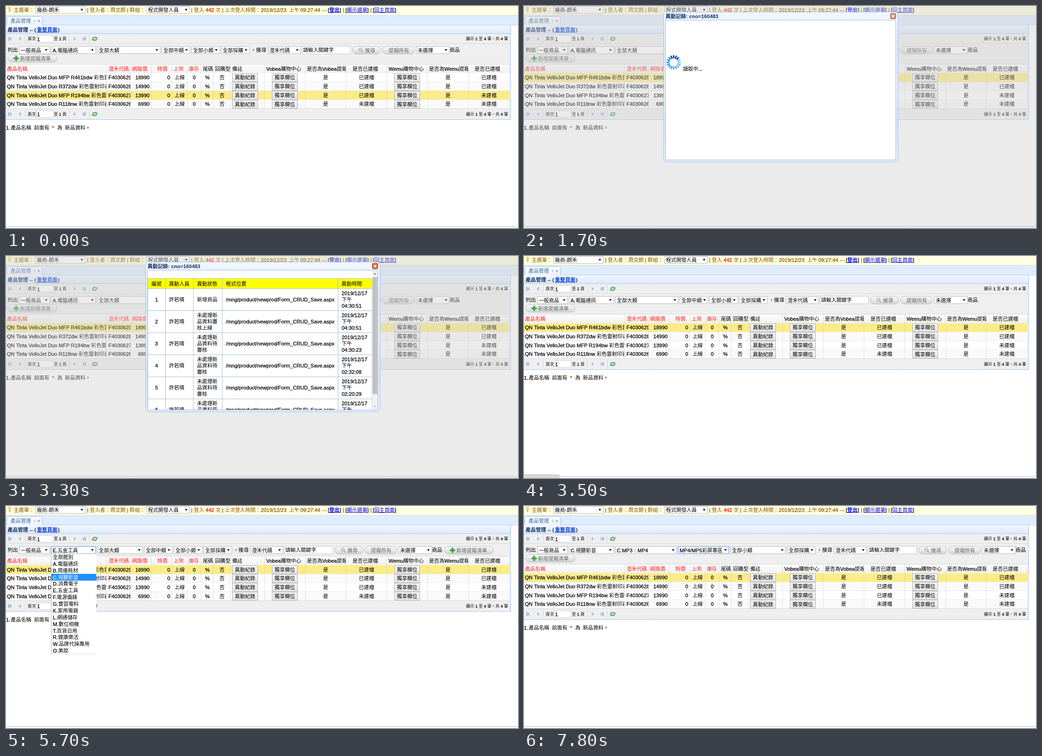
Write an HTML page with a canvas that moves like this. It is 1134 px wide and 494 px high and loops after 8000 ms.

```html
<!DOCTYPE html>
<html lang="zh-Hant">
<head>
<meta charset="utf-8">
<title>產品管理</title>
<style>
html, body { margin: 0; width: 100%; height: 100%; overflow: hidden; background: #fff; }
canvas { display: block; width: 1134px; height: 494px; }
</style>
</head>
<body>
<canvas id="stage"></canvas>
<script>
const W = 1134, H = 494, LOOP = 8000;
const canvas = document.getElementById('stage');
const dpr = window.devicePixelRatio || 1;
canvas.width = W * dpr;
canvas.height = H * dpr;
const c = canvas.getContext('2d');

const SANS = '"Liberation Sans", "Noto Sans CJK TC", "Noto Sans CJK", sans-serif';
const SIZE = 11.33, SMALL = 9;
const BLUE = '#99bbe8', LINK = '#0000ee', BROWN = '#8a5200', NAVY = '#0e2d5f';

const MENU1 = ['全部館別', 'A.電腦通訊', 'B.周邊耗材', 'C.視聽影音', 'D.消費電子', 'E.五金工具', 'F.電源儀錶',
  'G.實習電料', 'K.家用電器', 'L.網通儲存', 'M.數位相機', 'T.百貨日用', 'R.健康樂活', 'W.品牌代操專用', 'O.美妝'];
const MENU2 = ['全部大類', 'C.電視音響', 'C.MP3｜MP4', 'C.耳機', 'C.麥克風', 'C.喇叭', 'C.投影機',
  'C.錄音筆', 'C.播放器', 'C.影音線材', 'C.生活電器'];
const MENU3 = ['全部中類', 'MP3隨身聽', 'MP4/MP5彩屏專區', '影音配件'];
const MENUS = { 1: MENU1, 2: MENU2, 3: MENU3 };

const PRODUCTS = [
  ['QN Tinta VelloJet Duo MFP R461bdw', '18990', 1, 1],
  ['QN Tinta VelloJet Duo R372dw', '14990', 1, 1],
  ['QN Tinta VelloJet Duo MFP R194bw', '13990', 1, 0],
  ['QN Tinta VelloJet Duo R118nw', '6990', 0, 0]
];
const COLS = [0, 222.5, 276, 321.5, 367, 402, 432, 459, 497, 572.5, 663, 753, 843.5, 934, 1024, 1115];

// Each step changes some fields of the state and holds until the next.
const START = { sel: 2, hover: -1, view: '', scroll: 0, focus: -1, over: -1, open: 0, mark: 0,
  a: MENU1[1], b: MENU2[0], m: MENU3[0], wb: 140, wm: 63, ws: 63 };
const STEPS = [
  [1100, { hover: 1 }],
  [1300, { hover: 0 }],
  [1500, { press: 1 }],
  [1700, { hover: -1, press: 0, sel: 0, view: 'load' }],
  [1800, { view: 'table' }],
  [2500, { scroll: 25 }],
  [2700, { scroll: 0 }],
  [3300, { close: 1 }],
  [3500, { view: '', close: 0, status: 1 }],
  [3600, { status: 0 }],
  [3800, { reload: 1 }],
  [3900, { reload: 0 }],
  [4000, { over: 2 }],
  [4100, { over: 1 }],
  [4300, { over: -1, focus: 1, open: 1, mark: 1 }],
  [4500, { mark: 2 }],
  [4600, { mark: 4 }],
  [4700, { mark: 5 }],
  [4800, { open: 0, a: MENU1[5] }],
  [4900, { wb: 101 }],
  [5500, { open: 1, mark: 5 }],
  [5600, { mark: 4 }],
  [5700, { mark: 3 }],
  [6000, { open: 0, a: MENU1[3] }],
  [6100, { wb: 136.3 }],
  [6300, { focus: 2 }],
  [6400, { open: 2, mark: 0 }],
  [6600, { mark: 1 }],
  [6700, { mark: 2 }],
  [6900, { open: 0, b: MENU2[2], wm: 113 }],
  [7100, { focus: 3 }],
  [7200, { open: 3, mark: 0 }],
  [7400, { mark: 1 }],
  [7500, { mark: 2 }],
  [7800, { open: 0, m: MENU3[2], ws: 123 }]
];

function stateAt(t) {
  const s = { ...START };
  for (const [at, change] of STEPS) if (t >= at) Object.assign(s, change);
  return s;
}

function box(x, y, w, h, fill, stroke, r = 0) {
  c.beginPath();
  if (r) c.roundRect(x, y, w, h, r); else c.rect(x, y, w, h);
  if (Array.isArray(fill)) {
    const g = c.createLinearGradient(0, y, 0, y + h);
    fill.forEach((color, i) => g.addColorStop(i / (fill.length - 1), color));
    fill = g;
  }
  if (fill) { c.fillStyle = fill; c.fill(); }
  if (stroke) { c.strokeStyle = stroke; c.lineWidth = 1; c.stroke(); }
}

function line(x1, y1, x2, y2, color, width = 1) {
  c.strokeStyle = color;
  c.lineWidth = width;
  c.beginPath();
  c.moveTo(x1, y1);
  c.lineTo(x2, y2);
  c.stroke();
}

function poly(points, color) {
  c.fillStyle = color;
  c.beginPath();
  points.forEach(([x, y]) => c.lineTo(x, y));
  c.fill();
}

// y is the middle of the line; Latin runs are slightly emboldened.
function text(str, x, y, { color = '#000', size = SIZE, align = 'left', bold = false, underline = false } = {}) {
  c.font = `${bold ? 'bold ' : ''}${size}px ${SANS}`;
  const w = c.measureText(str).width;
  if (align === 'right') x -= w;
  if (align === 'center') x -= w / 2;
  c.fillStyle = c.strokeStyle = color;
  const base = y + size * 0.36;
  let at = x;
  for (const run of str.match(/[\x00-\xff]+|[^\x00-\xff]+/g)) {
    c.fillText(run, at, base);
    if (!bold && run.charCodeAt(0) < 256) { c.lineWidth = 0.3; c.strokeText(run, at, base); }
    at += c.measureText(run).width;
  }
  if (underline) line(x, y + 5.5, x + w, y + 5.5, color);
}

function clipped(x, y, w, h, draw) {
  c.save();
  c.beginPath();
  c.rect(x, y, w, h);
  c.clip();
  draw();
  c.restore();
}

function select(x, y, w, label, focused, over) {
  box(x + 0.5, y + 0.5, w - 1, 16, '#fff', focused ? '#4d8be0' : over ? '#777' : '#b4b4b4');
  text(label, x + 3.5, y + 9);
  poly([[x + w - 11, y + 6.5], [x + w - 5, y + 6.5], [x + w - 8, y + 11]], '#222');
}

function pill(x, y, w, label, pad) {
  box(x + 0.5, y + 0.5, w - 1, 17, ['#fafafa', '#e9e9e9', '#d2d2d2'], '#bdbdbd', 8.5);
  text(label, x + pad, y + 9, { color: '#666' });
}

function button(x, y, label, pressed) {
  box(x + 0.5, y + 0.5, 56, 18, pressed ? '#dcdcdc' : ['#f6f6f6', '#e6e6e6'], pressed ? '#777' : '#adadad');
  text(label, x + 28.5, y + 9.5, { align: 'center' });
}

function arrowIcon(x, y, dir, bar) {
  poly([[x + 3 * dir, y], [x - 2 * dir, y - 4.5], [x - 2 * dir, y + 4.5]], '#9dbce6');
  if (bar) box(x + 3.5 * dir - 1, y - 4.5, 2, 9, '#86a9da');
}

function refreshIcon(x, y) {
  for (const d of [1, -1]) {
    c.strokeStyle = '#55a868';
    c.lineWidth = 2.6;
    c.beginPath();
    c.ellipse(x, y, 4.3, 3.3, 0, d > 0 ? 3.3 : 0.15, d > 0 ? 5.6 : 2.5);
    c.stroke();
    poly([[x + 6 * d, y - 4.5 * d], [x + 6 * d, y], [x + 1.5 * d, y]], '#55a868');
  }
}

function pager(y, reload) {
  box(0, y - 11, 1117, 22, '#efefef');
  arrowIcon(10, y, -1, true);
  arrowIcon(31, y, -1);
  arrowIcon(152, y, 1);
  arrowIcon(172, y, 1, true);
  for (const x of [42.5, 140.5, 184.5]) line(x, y - 9, x, y + 9, '#d6d6d6');
  if (reload) box(186.5, y - 9.5, 20, 19, '#e3eeff', BLUE, 2);
  refreshIcon(196.5, y);
  text('頁次', 48, y, { size: SMALL });
  box(67.5, y - 7.5, 37, 15, '#fff', '#cfcfcf');
  text('1', 69, y + 0.5);
  text('至 1 頁', 106, y, { size: SMALL });
  text('顯示 1 至 4 筆，共 4 筆', 1112, y, { size: SMALL, align: 'right' });
}

function topBar() {
  box(0, 0, W, 20, '#ffffe1');
  line(0, 20.5, W, 20.5, '#d5dbe2');
  c.fillStyle = '#f3d768';
  c.beginPath();
  c.arc(8, 5, 3.6, 0, 7);
  c.fill();
  box(6.5, 8, 3, 5, '#b9b39a');
  const parts = [['主選單：', 17], ['| 登入者：周文朗 | 群組：', 179.5], ['| 登入', 410],
    ['次 | 上次登入時間：', 464], ['2019/12/23', 564.5], ['上午', 627], ['09:27:44 ---', 652],
    ['|', 746], ['|', 807]];
  for (const [str, x] of parts) text(str, x, 9, { color: BROWN });
  text('442', 442, 9, { color: '#f00' });
  select(65, 0, 111, '廠商-朗禾');
  select(311, 0, 96, '程式開發人員');
  for (const [str, x, end, bold] of [['登出', 716, 739, true], ['顯示選單', 755, 800], ['回主頁面', 815.5, 861]]) {
    text('[', x - 3.3, 9);
    text(str, x, 9, { color: LINK, underline: true, bold });
    text(']', end, 9);
  }
}

function tabs() {
  box(0, 21, W, 21, '#e0ecff');
  box(1.5, 23.5, 79, 20, ['#ffffff', '#eaf2ff'], BLUE, [4, 4, 0, 0]);
  text('產品管理', 10, 33, { color: '#416aa3' });
  c.strokeStyle = '#8c9cb4';
  c.lineWidth = 1;
  c.beginPath();
  c.arc(64, 33, 2, 0.3, 5.4);
  c.stroke();
  line(70.5, 31, 75, 35.5, '#7b9cc9', 1.2);
  line(75, 31, 70.5, 35.5, '#7b9cc9', 1.2);
  box(0, 42, 1117, 20, ['#f3f8ff', '#dce9fd']);
  line(80, 42.5, W, 42.5, '#b8d0f0');
  line(0, 61.5, 1117, 61.5, '#adc8ec');
  text('產品管理 -- (', 3.5, 53, { color: NAVY, bold: true });
  text('重整頁面', 68.5, 53, { color: '#0b3fd0', bold: true, underline: true });
  text(')', 115, 53, { color: NAVY, bold: true });
}

// Places the filter row; the last button wraps when it runs out of room.
function toolbar(s) {
  const labels = ['一般商品', s.a, s.b, s.m, '全部小類', '全部採購'];
  const widths = [68, 99.5, s.wb, s.wm, s.ws, 63];
  const xs = [];
  let end = 26.2;
  for (const w of widths) { xs.push(end + 2.8); end += w + 2.8; }
  const wraps = end + 579 > 1115;
  const dy = wraps ? 0 : -17.8;
  box(0, 84, 1117, 45 + dy, '#efefef');
  line(0, 83.5, 1117, 83.5, '#d9d9d9');
  text('列出', 3.5, 98);
  labels.forEach((label, i) => select(xs[i], 89.5, widths[i], label, s.focus === i, s.over === i));
  text('，搜尋', end + 3, 98);
  select(end + 40.5, 89.5, 73, '澄禾代碼');
  box(end + 116.5, 89.5, 107, 17, '#fff', '#c4c4c4');
  text('請輸入關鍵字', end + 118.5, 98);
  pill(end + 227.5, 89.5, 63.5, '搜尋', 28);
  const gx = end + 245.5;
  c.fillStyle = '#c4def4';
  c.strokeStyle = '#8fb3d3';
  c.lineWidth = 1.3;
  c.beginPath();
  c.arc(gx, 97, 3.6, 0, 7);
  c.fill();
  c.stroke();
  line(gx + 2.5, 99.8, gx + 5.5, 103, '#c99a6a', 2);
  pill(end + 294, 89.5, 72, '提報所有', 14);
  select(end + 369, 89.5, 74, '未選擇');
  text('商品', end + 443, 98);
  const px = wraps ? 3.5 : end + 469.5, py = wraps ? 107.5 : 89.5;
  pill(px, py, 110, '新增提報清單', 27.5);
  box(px + 17, py + 3, 4, 12, '#3aa33c', null, 1);
  box(px + 13, py + 7, 12, 4, '#3aa33c', null, 1);
  return { xs, widths, dy };
}

function grid(s, dy) {
  const top = 129 + dy, rowH = 19.7, first = top + 20.5, bottom = first + 4 * rowH;
  box(0, top, 1117, 20.5, ['#fdfdfd', '#f1f1f1']);
  line(0, top + 0.5, 1117, top + 0.5, '#d4d4d4');
  const heads = [['產品名稱', 2, 1], ['澄禾代碼', 227, 1], ['網路價', 279, 1], ['特價', 335, 1], ['上架', 371, 1],
    ['庫存', 405, 1], ['尾碼', 436], ['回購型', 463], ['備註', 501], ['Vobea購物中心', 576.5],
    ['是否為Vobea提報', 666.5], ['是否已建檔', 767.5], ['Wemu購物中心', 847.5],
    ['是否為Wemu提報', 937], ['是否已建檔', 1038]];
  heads.forEach(([str, x, red], i) => clipped(COLS[i], top, COLS[i + 1] - COLS[i], 21, () =>
    text(str, x, top + 11, { color: red ? '#f22' : '#000' })));

  PRODUCTS.forEach(([name, price, listedA, listedB], i) => {
    const y = first + i * rowH, mid = y + 9.8;
    box(0, y, 1115, rowH, i === s.sel ? '#fbec88' : i === s.hover ? '#d0e5f5' : i % 2 ? '#fafafa' : '#fff');
    line(0, y + rowH, 1115, y + rowH, '#dedede');
    clipped(0, y, 222, rowH, () => text(name + ' 彩色雷射印表機', 2, mid));
    clipped(222, y, 54, rowH, () => text('F403062' + (9 - i), 227, mid));
    text(price, 318, mid, { align: 'right' });
    text('0', 363.5, mid, { align: 'right' });
    const built = ok => ok ? '已建檔' : '未建檔';
    for (const [str, x] of [['上線', 384.5], ['0', 417], ['%', 446], ['否', 478.5], ['是', 708],
      [built(i < 3), 798.5], ['是', 979], [built(listedB), 1069.5]]) text(str, x, mid, { align: 'center' });
    button(501, y + 0.4, '異動紀錄', s.press && i === 0);
    button(589, y + 0.4, '獨享欄位');
    button(860, y + 0.4, '獨享欄位');
  });

  c.setLineDash([1, 1]);
  for (const x of COLS.slice(1)) line(x, top, x, bottom, '#c6c6c6');
  c.setLineDash([]);
  pager(240.5 + dy);
  line(0, bottom + 0.5, 1117, bottom + 0.5, '#d9d9d9');
  line(0, 252.5 + dy, 1118, 252.5 + dy, BLUE);
  line(1117.5, 42, 1117.5, 253 + dy, BLUE);

  const y = 271 + dy;
  for (const [str, x, color] of [['1.', 0], ['產品名稱', 10.5], ['前面有', 62], ['*', 102, '#f00'],
    ['為', 113.5], ['新品資料。', 130.5]]) text(str, x, y, { color });
}

function menu(s, { xs, widths }) {
  const items = MENUS[s.open], x = xs[s.open], w = widths[s.open], pitch = 14.87;
  box(x, 106.5, w + 0.5, items.length * pitch + 0.5, '#fff');
  items.forEach((label, i) => {
    const y = 106.5 + i * pitch, on = i === s.mark;
    if (on) box(x, y, w + 0.5, pitch, '#1e90ff');
    text(label, x + 4, y + 7.4, { color: on ? '#fff' : '#000' });
  });
  const end = 106.5 + items.length * pitch;
  line(x + 0.5, 106, x + 0.5, end, '#8fb2e0');
  line(x, end, x + w, end, '#dcdcdc');
}

function spinner(x, y) {
  c.lineCap = 'butt';
  for (let i = 0; i < 16; i++) {
    const a = -Math.PI / 2 + (i - 1) * Math.PI / 8;
    const near = i < 4;
    line(x + 9 * Math.cos(a), y + 9 * Math.sin(a), x + 16 * Math.cos(a), y + 16 * Math.sin(a),
      near ? '#1247b5' : `hsl(204, 85%, ${52 + (15 - i) * 2}%)`, 3.4);
  }
}

function logTable(scroll) {
  const xs = [314, 353.5, 415, 479, 735.5, 811], top = 50 - scroll, head = top + 22.5, rowH = 49.1;
  box(314, top, 497, 22.5, '#ff0');
  ['編號', '異動人員', '異動狀態', '程式位置', '異動時間'].forEach((str, i) =>
    text(str, [322, 361, 423, 487, 743][i], top + 12));
  const times = ['30:51', '30:51', '30:23', '32:08', '20:29', '20:22'];
  times.forEach((time, i) => {
    const mid = head + i * rowH + 24;
    text(String(i + 1), 333.5, mid, { align: 'center' });
    text('許若晴', 361, mid);
    const status = i === 0 ? ['新增商品'] : i === 1 ? ['未處理新', '品資料審', '核上線'] : ['未處理新', '品資料待', '審核'];
    status.forEach((str, k) => text(str, 423, mid + (k - (status.length - 1) / 2) * 14));
    text('/mng/product/newprod/Form_CRUD_Save.aspx', 487, mid);
    ['2019/12/17', '下午', (i < 3 ? '04:' : '02:') + time].forEach((str, k) => text(str, 743.5, mid + (k - 1) * 14));
  });
  const bottom = head + 6 * rowH;
  for (let i = 0; i <= 6; i++) line(314, head + i * rowH, 811, head + i * rowH, '#9dbfd0');
  line(314, top, 811, top, '#9dbfd0');
  for (const x of xs) line(x, top, x, bottom, '#9dbfd0');
  box(811.5, 32, 11.5, 310, '#f1f1f1');
  box(812, 47 + scroll * 0.84, 10.5, 260, '#c1c1c1');
  poly([[814.5, 41], [819.5, 41], [817, 38]], '#555');
  poly([[814.5, 333.5], [819.5, 333.5], [817, 336.5]], '#aaa');
}

function dialog(s) {
  c.fillStyle = 'rgba(204,204,204,0.4)';
  c.fillRect(0, 0, W, H);
  box(309.5, 13.5, 519, 333, ['#f2f7ff', '#dfebfd', '#e8f1ff', '#d8e6fb', '#e6f0ff'], '#9dbdea', 5);
  text('異動記錄: cno=160483', 313.5, 23, { color: NAVY, bold: true });
  box(811.5, 16.5, 12, 12, s.close ? '#e8582f' : '#d5806a', s.close ? '#a8310f' : '#b96751', 2);
  line(814.5, 19.5, 820.5, 25.5, '#fff', 1.8);
  line(820.5, 19.5, 814.5, 25.5, '#fff', 1.8);
  box(313.5, 31.5, 510, 311, '#fff', BLUE);
  clipped(314, 32, 509, 310, () => {
    if (s.view === 'table') return logTable(s.scroll);
    spinner(331.5, 125.5);
    text('讀取中...', 352, 140);
  });
}

function draw(s) {
  c.setTransform(dpr, 0, 0, dpr, 0, 0);
  box(0, 0, W, H, '#fff');
  topBar();
  tabs();
  pager(73, s.reload);
  const bar = toolbar(s);
  grid(s, bar.dy);
  line(0, 490.5, W, 490.5, BLUE);
  if (s.open) menu(s, bar);
  if (s.status) box(-4, 486.5, 82, 12, '#d6d8dc', '#c3c5c9', 3);
  if (s.view) dialog(s);
}

const began = performance.now();
function tick() {
  draw(stateAt((performance.now() - began) % LOOP));
  requestAnimationFrame(tick);
}
tick();
</script>
</body>
</html>
```
